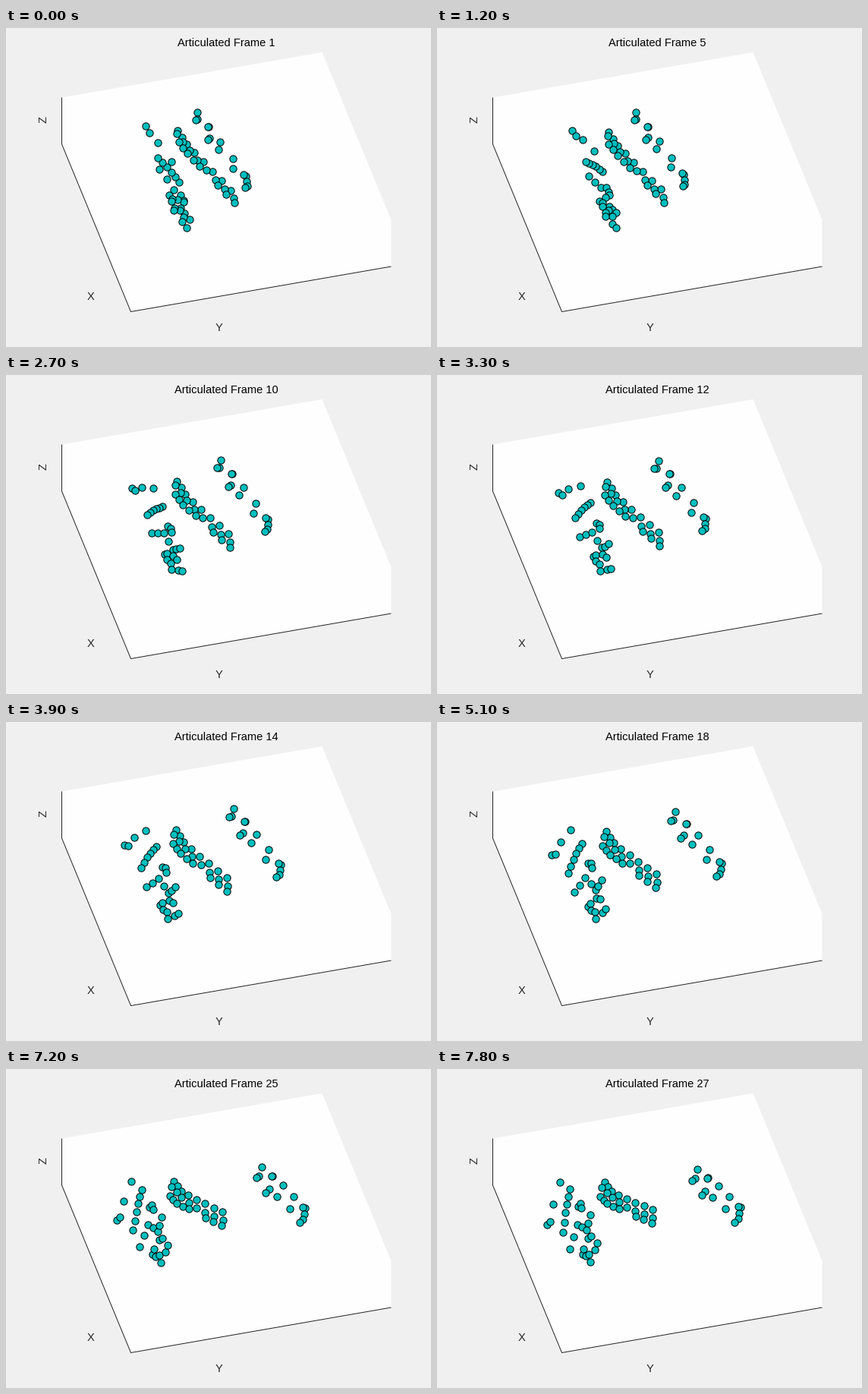
Recreate the animation shown at these times as a matplotlib script. Size 560 px wide and 420 px high, loop 8000 ms.

```python
import numpy as np
import matplotlib.pyplot as plt
from matplotlib.animation import FuncAnimation

W, H, DPI = 560, 420, 100
PX = 72 / DPI
STEPS, HOLD, TICKS = 27, 3, 80
INK = "#262626"

# Steps at which the guide corners of a body are known; bodies are laid out
# in the pose of the REST key.
KEY_STEPS = np.array([0, 4, 13, 26], float)
REST = 2


def strand(count, *knots):
    """Points spread evenly along a polyline."""
    knots = np.array(knots, float)
    u = np.linspace(0, len(knots) - 1, count)
    marks = np.arange(len(knots))
    return np.column_stack([np.interp(u, marks, axis) for axis in knots.T])


class Body:
    """A point cloud carried by the affine motion of its corners."""

    def __init__(self, corners, *strands):
        self.points = np.concatenate(strands)
        self.keys = np.array(corners, float).transpose(1, 0, 2)
        self.slopes = np.gradient(self.keys, KEY_STEPS, axis=0)

    def corners_at(self, step):
        """Cubic Hermite curve through the corner keys."""
        k = min(np.searchsorted(KEY_STEPS, step, side="right") - 1,
                len(KEY_STEPS) - 2)
        span = KEY_STEPS[k + 1] - KEY_STEPS[k]
        u = (step - KEY_STEPS[k]) / span
        ease = u * u * (3 - 2 * u)
        bow = span * u * (1 - u) * ((1 - u) * self.slopes[k]
                                    - u * self.slopes[k + 1])
        return (1 - ease) * self.keys[k] + ease * self.keys[k + 1] + bow

    def at(self, step):
        rest, now = self.keys[REST], self.corners_at(step)
        centre = rest.mean(axis=0)
        turn = np.linalg.lstsq(rest - centre, now - now.mean(axis=0),
                               rcond=None)[0]
        return now.mean(axis=0) + (self.points - centre) @ turn


arm = Body(
    [[(184, 130), (178, 136), (156, 162), (145, 205)],
     [(219, 175), (207, 161), (184, 143), (162, 150)],
     [(241, 253), (236, 244), (223, 217), (202, 191)],
     [(222, 239), (222, 247), (213, 259), (202, 254)]],
    strand(2, (156, 162), (161, 163)),
    strand(2, (169, 152), (184, 143)),
    strand(6, (198, 164), (188, 175), (178, 192)),
    strand(3, (185, 217), (201, 206)),
    strand(3, (206, 191), (210, 192), (211, 198)),
    strand(4, (208, 216), (214, 225), (218, 222), (223, 217)),
    strand(4, (203, 241), (206, 238), (215, 235), (220, 238)),
    strand(3, (207, 247), (212, 250), (213, 259)),
    strand(2, (222, 255), (227, 252)))

trunk = Body(
    [[(226, 136), (226, 138), (224, 142), (221, 149)],
     [(228, 148), (227, 151), (221, 159), (216, 167)],
     [(296, 212), (295, 211), (291, 205), (284, 185)],
     [(301, 232), (299, 231), (291, 223), (283, 203)]],
    strand(8, (224, 142), (236, 161), (263, 183), (291, 205)),
    strand(8, (221, 148), (238, 170), (264, 195), (292, 216)),
    strand(5, (220, 160), (230, 173), (246, 186)),
    strand(3, (269, 205), (291, 223)))

wing = Body(
    [[(251, 110), (262, 110), (300, 114), (343, 131)],
     [(267, 148), (276, 148), (308, 149), (349, 167)],
     [(317, 196), (326, 194), (362, 188), (400, 183)],
     [(314, 209), (323, 207), (356, 204), (392, 201)]],
    strand(5, (300, 114), (330, 148), (362, 188)),
    strand(2, (297, 124), (294, 125)),
    strand(3, (314, 131), (312, 146), (308, 149)),
    strand(2, (323, 159), (342, 181)),
    strand(4, (359, 186), (362, 200), (356, 204)))

fig = plt.figure(figsize=(W / DPI, H / DPI), dpi=DPI, facecolor="#f0f0f0")
ax = fig.add_axes([0, 0, 1, 1])
ax.set_xlim(0, W)
ax.set_ylim(H, 0)
ax.axis("off")

# The plot box as seen by the tilted camera.
top = np.array([73.5, 91.5])
x_edge, y_edge, z_edge = np.array([[91, 220.5], [343, -59.5], [0, 61.5]])
low = top + z_edge
near = low + x_edge
right = near + y_edge
ax.fill(*np.transpose([top, top + y_edge, right - z_edge, right, near, low]),
        color="#fefefe", lw=0)
ax.plot(*np.transpose([top, low, near, right]), color=INK, lw=PX,
        solid_capstyle="butt")


def label(x, baseline, text, color=INK, rotation=0):
    return ax.text(x, baseline, text, color=color, rotation=rotation,
                   family="Liberation Sans", fontsize=14.67 * PX,
                   ha="center", va="baseline", rotation_mode="anchor")


label(112, 358, "X")
label(280, 399, "Y")
label(54, 120.5, "Z", rotation=90)
title = label(290, 24, "", color="black")
dots, = ax.plot([], [], "o", ms=9.3 * PX, mfc="#00bfbf", mec="black", mew=PX)


def draw(tick):
    step = min(tick // HOLD, STEPS - 1)
    cloud = np.concatenate([body.at(step) for body in (arm, trunk, wing)])
    dots.set_data(*cloud.T)
    title.set_text(f"Articulated Frame {step + 1}")
    return dots, title


anim = FuncAnimation(fig, draw, frames=TICKS, interval=100, repeat=True,
                     repeat_delay=0)
plt.show()
```
